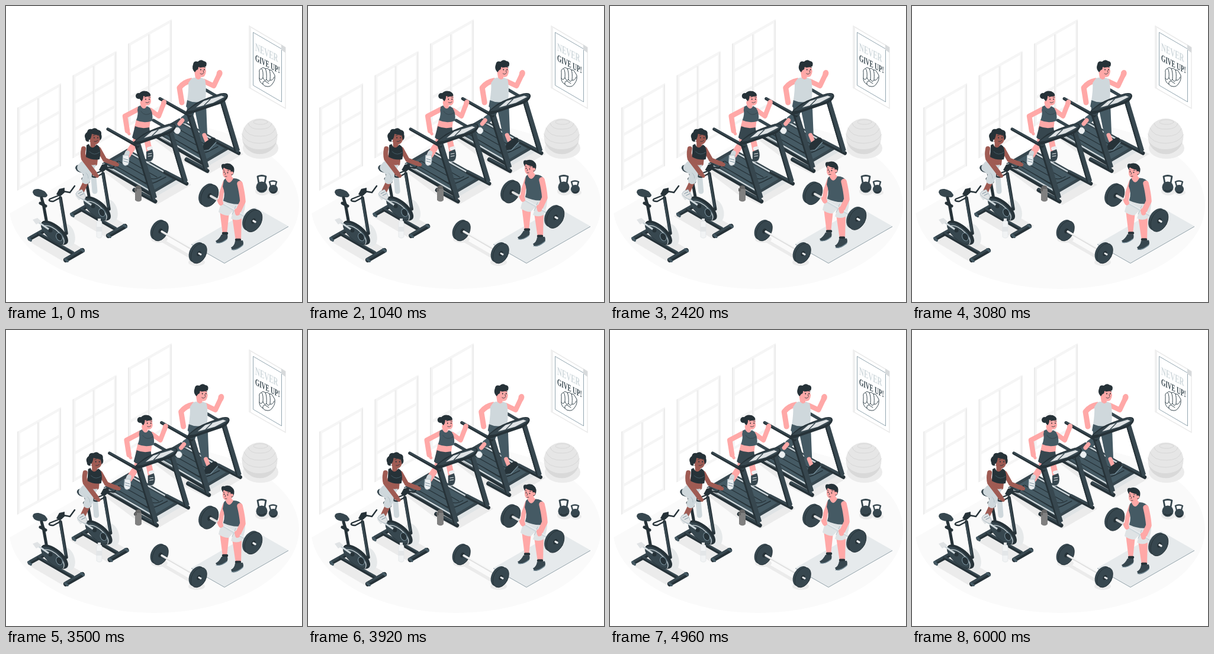
An HTML page for the animation above (6.04 s loop, 500 by 500 pixels).

```html
<!DOCTYPE html>
<html lang="en">
<head>
<meta charset="utf-8">
<title>Gym</title>
<style>
html, body { margin: 0; width: 100%; height: 100%; overflow: hidden; background: #fff }
svg { display: block; width: 100vw; height: 100vh }
.line { fill: none; stroke-linecap: round; stroke-linejoin: round }
.skin { stroke: #ffa8a7 }
.brown { stroke: #9f5b53 }
.dark { stroke: #37474f }
.deep { stroke: #263238 }
.cloth { stroke: #cfd8dc }
text { font: bold 19px "Liberation Serif", serif }
</style>
</head>
<body>
<svg viewBox="0 0 500 500">
<defs>
  <clipPath id="room"><path d="M0 354L285 190L500 190V500H0z"/></clipPath>

  <g id="window" transform="matrix(1 -.567 0 1 19 172)">
    <path d="M0 0H74V140H0z" fill="#f5f5f5"/>
    <path d="M0 0H2V140H0zM72 2h2V140h-2zM34 4h2V136h-2z" fill="#ebebeb"/>
    <path d="M5 5H34V45H5zM38 5H70V45H38zM5 50H34V90H5zM38 50H70V90H38zM5 95H34V135H5zM38 95H70V135H38z" fill="#fff"/>
  </g>

  <g id="plate">
    <ellipse rx="12" ry="18" transform="translate(-1.8 -1) rotate(28)" fill="#37474f"/>
    <ellipse rx="12" ry="18" transform="translate(1.8 1) rotate(28)" fill="#37474f" stroke="#263238" stroke-width=".8"/>
    <ellipse rx="3" ry="4.5" transform="translate(1.8 1) rotate(28)" fill="#263238"/>
  </g>

  <g id="deck" class="line">
    <path d="M249 193L280 211" class="dark" stroke-width="5"/>
    <path d="M162 266L205 241L293 291L246 321z" fill="#37474f"/>
    <path d="M162 268L246 317V322L162 273z" fill="#263238"/>
    <path d="M172 266L203 248L281 292L246 313z" fill="#455a64"/>
    <path d="M180 267L234 298Q244 302 254 297L270 289M190 262L240 290Q250 295 262 288M201 258L255 289M174 263L244 305" class="deep" stroke-width="1.4"/>
    <path d="M165 267L243 312M206 246L288 292" stroke="#cfd8dc" stroke-width="2.4"/>
    <path d="M248 317L291 292L298 296L255 321z" fill="#dfe3e5"/>
    <path d="M269 281L305 300" class="deep" stroke-width="6.5"/>
    <path d="M269 279L304 297" class="dark" stroke-width="4"/>
    <path d="M274 215L282 212L307 295L299 300z" fill="#37474f"/>
    <path d="M274 215L276 214L301 299L299 300z" fill="#263238"/>
  </g>

  <g id="console" class="line">
    <path d="M217 311L252 330" class="deep" stroke-width="7"/>
    <path d="M217 309L251 327" class="dark" stroke-width="4"/>
    <path d="M216 231L226 228L255 323L246 328z" fill="#37474f"/>
    <path d="M216 231L219 230L248 327L246 328z" fill="#263238"/>
    <path d="M172 208L223 237" class="deep" stroke-width="5"/>
    <path d="M172 207L223 235" class="dark" stroke-width="3"/>
    <path d="M215 231Q217 227 232 216Q250 206 275 199Q287 197 287 204Q286 210 276 216L229 232Q216 237 215 231z" fill="#263238"/>
    <path d="M218 229Q238 211 276 200Q285 199 285 203Q283 208 274 212L228 228z" fill="#37474f"/>
    <path d="M233 223L246 212L276 203L281 205L262 215z" fill="#dfe3e5"/>
    <path d="M247 219L257 209" stroke="#37474f" stroke-width="1.4"/>
  </g>

  <g id="bike" class="line">
    <ellipse cx="104" cy="387" rx="12" ry="20" transform="rotate(-16 104 387)" fill="#e6e9ea"/>
    <path d="M40 393L71 376" class="deep" stroke-width="7"/>
    <path d="M40 391L70 374" class="dark" stroke-width="4"/>
    <path d="M55 385L114 419" class="deep" stroke-width="5"/>
    <path d="M55 383L114 416" class="dark" stroke-width="3"/>
    <path d="M101 429L129 413" class="deep" stroke-width="8"/>
    <path d="M101 427L128 411" class="dark" stroke-width="4"/>
    <path d="M38 392l4 4M100 428l4 3M127 411l4 3" stroke="#455a64" stroke-width="4"/>
    <path d="M102 384L92 324" class="deep" stroke-width="5.5"/>
    <path d="M101 380L91 324" class="dark" stroke-width="3.5"/>
    <path d="M69 367L63 334" class="deep" stroke-width="5"/>
    <path d="M58 333L67 338" class="deep" stroke-width="5"/>
    <ellipse cx="82" cy="383" rx="28" ry="13" transform="rotate(40 82 383)" fill="#263238"/>
    <ellipse cx="80" cy="384" rx="25" ry="10.5" transform="rotate(40 80 384)" fill="#37474f"/>
    <path d="M66 371Q77 370 90 383Q101 395 97 402" stroke="#cfd8dc" stroke-width="1.2"/>
    <ellipse cx="90" cy="390" rx="5" ry="7" transform="rotate(-25 90 390)" fill="#263238" stroke="#78909c"/>
    <path d="M56 366L75 379" class="cloth" stroke-width="3"/>
    <circle cx="75" cy="379" r="3.5" fill="#263238"/>
    <path d="M45 361L53 358L60 364L51 369z" fill="#e0e3e5"/>
    <path d="M45 315Q45 308 55 309Q66 311 70 319Q70 324 63 323Q48 324 45 315z" fill="#37474f"/>
    <path d="M60 324L63 335" class="deep" stroke-width="5"/>
    <path d="M94 318L74 326Q70 330 80 330L91 324M97 313L108 315L116 304" class="deep" stroke-width="2.4"/>
    <path d="M85 318L90 309L99 307L99 315L91 322z" fill="#263238"/>
  </g>
</defs>

<!-- room -->
<ellipse cx="250" cy="337" rx="245" ry="141" fill="#fafafa" clip-path="url(#room)"/>
<use href="#window"/>
<use href="#window" x="93.5" y="-54.5"/>
<use href="#window" x="187" y="-108"/>

<g fill="#ebebeb">
  <path d="M160 276L205 252L313 302L254 336L216 318z"/>
  <path d="M248 224L293 200L401 250L342 284L304 266z"/>
  <path d="M36 396L70 376L134 412L101 434z"/>
  <path d="M108 355L142 335L206 371L173 393z"/>
  <ellipse cx="430" cy="240" rx="30" ry="18"/>
  <ellipse cx="433" cy="313" rx="12" ry="7"/>
  <ellipse cx="453" cy="315" rx="9" ry="5"/>
  <ellipse cx="259" cy="394" rx="14" ry="6"/>
  <ellipse cx="322" cy="433" rx="14" ry="6"/>
  <path d="M262 392L312 421L308 425L258 396z"/>
</g>

<!-- poster -->
<path d="M411 34L472 70V173L411 138z" fill="#fff" stroke="#ebebeb" stroke-width="1.5"/>
<path d="M411 34L414 36V139L411 138z" fill="#f0f0f0"/>
<path d="M417.5 44.5L465.500 72.500V162L417.500 134z" fill="none" stroke="#78909c" stroke-width=".8"/>
<path d="M465 65L472 70V79L465 74z" fill="#d7dadc"/>
<g transform="matrix(.58 .3 0 1 421 75)">
  <text fill="#cfd8dc">NEVER</text>
  <text y="17.500" fill="#37474f" style="font-size:16px">GIVE UP!</text>
</g>
<g class="line dark" stroke-width="1">
  <path d="M428 112Q427 107 431 106Q434 102 438 106Q442 104 445 108Q449 107 451 112L454 117Q455 125 451 130Q447 137 441 136Q436 136 434 132Q429 130 428 124z" fill="#fff"/>
  <path d="M432 106Q435 110 434 121M438 106Q441 111 440 124M445 108Q447 113 446 125M428 122Q431 127 434 121Q437 128 440 124Q443 130 446 125Q450 127 453 120M434 132Q433 126 438 127L444 131"/>
</g>

<!-- ball and kettlebells -->
<circle cx="428.500" cy="220" r="30" fill="#e6e6e6"/>
<path d="M399.500 228Q410 243 430 242Q450 241 457.500 228A30 30 0 0 1 399.500 228z" fill="#d9d9d9"/>
<g class="line" stroke="#d4d4d4" stroke-width=".8">
  <ellipse cx="430" cy="196" rx="12" ry="4"/>
  <path d="M409 198Q412 209 430 208Q447 208 449 198M402 206Q408 221 430 220Q450 220 455 207M398.500 216Q405 232 429 232Q452 231 458.500 217"/>
</g>
<g class="line dark">
  <path d="M427 299L425 288Q432 285 439 288L437 299" stroke-width="2.800"/>
  <circle cx="432" cy="306" r="9.600" fill="#37474f" stroke="none"/>
  <path d="M447 304L445 297Q451 294 457 297L455 304" stroke-width="2.400"/>
  <circle cx="451.500" cy="309.500" r="7.600" fill="#37474f" stroke="none"/>
  <path d="M427 311Q432 315 438 310M448 314Q452 317 456 313" class="deep" stroke-width="2"/>
</g>

<path d="M313 402L421 340L477 372L369 434z" fill="#e6eaec"/>
<path d="M313 402.500L369 434.500L477 372.500" fill="none" stroke="#90a0a8"/>
<use href="#bike"/>

<!-- machines and runners -->
<g id="shaker">
  <use href="#deck" x="88" y="-51.500"/>
  <g class="line">
    <path d="M312 168Q314 182 304 190L301 192" stroke="#455a64" stroke-width="13"/>
    <path d="M298 193L293 199" class="skin" stroke-width="7"/>
    <path d="M285 207Q290 203 293 207Q297 211 291 216Q285 216 284 211z" fill="#eceff1" stroke="#cfd8dc"/>
    <path d="M318 166H337L339 216L329 219z" fill="#455a64" stroke="#455a64" stroke-width="2"/>
    <path d="M335 218L339 228" class="skin" stroke-width="7"/>
    <path d="M330 243L335 231L348 222Q356 221 354 230L344 241Q335 249 330 243z" fill="#263238"/>
    <path d="M331 245L343 243L355 230" stroke="#78909c" stroke-width="1.200"/>
    <path d="M313 126Q301 128 293 138L297 163" class="skin" stroke-width="9"/>
    <path d="M334 127L351 135L360 116" class="skin" stroke-width="8.500"/>
    <path d="M356 112Q359 106 364 109Q368 114 362 121L355 120z" fill="#ffa8a7"/>
    <path d="M323 112L325 125" class="skin" stroke-width="9"/>
    <path d="M313 123Q319 119 322 123Q326 126 330 121L336 124Q339 136 337 160Q321 167 306 160Q309 140 308 130z" fill="#cfd8dc"/>
    <path d="M306 159Q321 166 337 159L338 172Q320 181 304 170z" fill="#455a64"/>
    <path d="M319 101Q324 95 335 98L338 110Q337 120 331 120Q321 120 319 108z" fill="#ffa8a7"/>
    <path d="M319 112Q313 106 316 99Q317 92 324 94Q329 89 334 93Q341 94 338 102Q331 105 325 103Q325 108 322 108z" fill="#263238"/>
    <path d="M329 107v1M335 107v1" class="deep" stroke-width="1.600"/>
    <path d="M327 104l3-1M334 103l3 1M333 109l1 3M328 114Q331 117 334 113" class="deep" stroke-width=".8"/>
  </g>
  <use href="#console" x="88" y="-51.500"/>

  <use href="#deck"/>
  <g class="line">
    <path d="M222 217Q220 231 214 238L205 252" class="skin" stroke-width="11"/>
    <path d="M205 248L203 254" class="cloth" stroke-width="8"/>
    <path d="M198 252L207 252Q209 262 206 268Q199 272 197 265z" fill="#eceff1" stroke="#b0bec5"/>
    <path d="M199 258l7 2M199 262l7 2" stroke="#78909c"/>
    <path d="M234 216L239 230L242 244" class="skin" stroke-width="10"/>
    <path d="M241 241L245 240" stroke="#eceff1" stroke-width="6"/>
    <path d="M237 246L247 242Q251 252 247 261Q241 267 237 261z" fill="#37474f"/>
    <path d="M238 263Q244 265 247 260M240 250l6-1M240 254l6-1" stroke="#eceff1"/>
    <path d="M224 174L201 186L205 211" class="skin" stroke-width="8.500"/>
    <path d="M203 207L208 216" class="skin" stroke-width="5"/>
    <path d="M244 176L258 186L265 168" class="skin" stroke-width="8"/>
    <path d="M263 170Q260 161 266 158Q272 158 271 164L268 171z" fill="#ffa8a7"/>
    <path d="M220 192H244L242 208H216z" fill="#ffa8a7"/>
    <path d="M218 203Q229 208 242 205L244 219Q238 223 230 219L225 226Q217 227 213 222z" fill="#37474f"/>
    <path d="M231 163L233 174" class="skin" stroke-width="9"/>
    <path d="M223 170L227 168Q233 178 238 169L243 172Q249 181 247 194Q233 199 220 193Q224 182 222 176z" fill="#455a64"/>
    <path d="M228 178Q235 188 246 180" class="dark"/>
    <path d="M228 151Q235 147 244 151L245 161Q244 168 238 168Q229 166 228 158z" fill="#ffa8a7"/>
    <circle cx="224" cy="152" r="5" fill="#263238"/>
    <path d="M229 161Q223 156 225 148Q229 142 238 144Q245 147 244 152Q237 154 232 152Q232 158 229 161z" fill="#263238"/>
    <path d="M236 157v1M242 157v1" class="deep" stroke-width="1.500"/>
    <path d="M234 154l3-1M241 154h3M236 163Q239 165 242 162" class="deep" stroke-width=".8"/>
  </g>
  <use href="#console"/>

  <g class="line">
    <path d="M134 276Q147 279 148 290L150 313" class="cloth" stroke-width="9"/>
    <use href="#bike" x="72" y="-41"/>
    <path d="M157 242L167 260L185 267" class="brown" stroke-width="7.500"/>
    <path d="M183 265L188 268" class="brown" stroke-width="6"/>
    <path d="M135 297L127 314" class="brown" stroke-width="9"/>
    <path d="M127 273Q138 279 138 286L135 294" class="cloth" stroke-width="14"/>
    <path d="M128 277Q140 283 139 291" stroke="#b0bec5" stroke-width="1"/>
    <path d="M121 313L128 310L132 316Q137 325 131 327Q122 324 118 318z" fill="#e0e3e5" stroke="#b0bec5"/>
    <path d="M122 317l6-3M125 320l6-3" stroke="#78909c"/>
    <path d="M136 246L156 250L154 268Q146 276 129 267L133 256z" fill="#9f5b53"/>
    <path d="M128 262Q140 271 152 268L148 278Q132 286 121 277Q121 267 128 262z" fill="#cfd8dc"/>
    <path d="M147 226L147 242" class="brown" stroke-width="9"/>
    <path d="M136 235L140 233Q145 245 153 234L157 237Q161 246 158 259Q146 261 135 255z" fill="#263238"/>
    <path d="M141 246Q149 254 158 247" stroke="#455a64"/>
    <path d="M131 241Q129 251 131 258L150 283" class="brown" stroke-width="8"/>
    <path d="M148 283L154 287" class="brown" stroke-width="6"/>
    <path d="M139 216Q149 209 159 216L159 226Q156 234 150 234Q140 231 139 223z" fill="#9f5b53"/>
    <path d="M140 229Q134 230 134 224Q131 217 137 213Q138 207 145 208Q151 204 155 209Q162 210 161 217Q163 223 159 227L157 218Q150 218 145 216Q144 223 142 225z" fill="#263238"/>
    <path d="M149 222v1M155 222v1" class="deep" stroke-width="1.600"/>
    <path d="M147 219l3-1M154 218l3 1M149 229Q152 230 155 227" class="deep" stroke-width=".8"/>
    <circle cx="141" cy="227" r="1.200" fill="#eceff1"/>
  </g>
</g>

<!-- bottles -->
<path d="M153 367Q153 363 155 363H160Q162 363 162 367V390Q158 394 153 390z" fill="#f1f3f4" stroke="#dfe3e5" stroke-width=".7"/>
<path d="M155 359h5v5h-5z" fill="#e3e6e8"/>
<path d="M153 373h9v8h-9z" fill="#e3e6e8"/>
<path d="M218 311Q218 307 221 307H226Q229 307 229 311V328Q224 333 218 328z" fill="#808080"/>
<path d="M219 305Q223 301 228 305V309H219zM217 308h4v5h-4z" fill="#666"/>

<!-- barbell on the floor -->
<g class="line">
  <use href="#plate" x="259" y="379"/>
  <path d="M263 381L318 413" stroke="#e0e0e0" stroke-width="3.400"/>
  <path d="M263 380L317 411" stroke="#f8f9f9" stroke-width="1.500"/>
  <use href="#plate" x="324" y="417"/>
  <path d="M326 418l3 1.600" stroke="#eceff1" stroke-width="3"/>
</g>

<g id="lifter" class="line">
  <use href="#plate" transform="translate(342 319.500) scale(1.1)"/>
  <path d="M346 321L364 331" stroke="#e0e0e0" stroke-width="4"/>
  <path d="M370 298L364 316L362 331" class="skin" stroke-width="7.500"/>
  <path d="M361 345L377 348L373 386H366z" fill="#ffa8a7"/>
  <path d="M382 356L398 354L397 397H388z" fill="#ffa8a7"/>
  <path d="M367 384h6M389 395h6" class="deep" stroke-width="4.500"/>
  <path d="M354 397Q360 394 364 386L374 386Q376 393 371 396Q362 402 356 400z" fill="#37474f"/>
  <path d="M380 408Q386 405 387 397L400 396Q403 404 397 407Q388 414 382 412z" fill="#37474f"/>
  <path d="M355 400Q363 402 373 394M381 411.500Q390 413 400 404" stroke="#78909c" stroke-width="1.100"/>
  <path d="M368 325L404 329Q405 344 398 359Q389 364 380 359L384 346L376 354Q367 354 359 348Q361 337 368 325z" fill="#dfe3e5"/>
  <path d="M388 338L382 352" stroke="#b0bec5"/>
  <path d="M375 285L379 298" class="skin" stroke-width="10"/>
  <path d="M368 294L371 291Q376 303 384 291Q395 291 399 299L404 333Q386 338 367 329Q371 316 366 305z" fill="#455a64"/>
  <path d="M371 292Q377 305 384 291L380 287H373z" fill="#ffa8a7"/>
  <path d="M362 331L410 359" stroke="#cfd8dc" stroke-width="4"/>
  <path d="M362 330L410 357.500" stroke="#eceff1" stroke-width="1.600"/>
  <path d="M395 300Q399 316 400 330L393 345" class="skin" stroke-width="9.500"/>
  <path d="M390 346L391 350M361 329L363 333" class="skin" stroke-width="8"/>
  <use href="#plate" transform="translate(416 362) scale(1.1)"/>
  <path d="M418 363l3 1.700" stroke="#eceff1" stroke-width="3.400"/>
  <path d="M366 273Q374 267 384 273L384 282Q380 292 373 291Q366 290 366 282z" fill="#ffa8a7"/>
  <path d="M366 277L364 272Q363 266 369 267Q377 264 382 269Q388 274 384 284L381 286L379 277Q372 276 368 273z" fill="#263238"/>
  <circle cx="381.500" cy="282" r="2.500" fill="#ffa8a7"/>
  <path d="M368.500 280v1M374.500 281v1" class="deep" stroke-width="1.500"/>
  <path d="M367 277l2 .5M374 278l3 0M371 282l-1 3M370 288h3" class="deep" stroke-width=".8"/>
</g>
</svg>
<script>
const LOOP = 6040, SPAN = 6000;
const shake = [0, -1, 2, -4, 4, -4, 4, -4, 2, -1, 0];
const shaker = document.getElementById('shaker');
const lifter = document.getElementById('lifter');

function draw(now) {
  const t = Math.min(now % LOOP, SPAN);
  const k = t / 600, i = Math.min(Math.floor(k), 9);
  const x = shake[i] + (shake[i + 1] - shake[i]) * (k - i);
  const y = 9 * (Math.abs(t % 3000 / 1500 - 1) - 1);
  shaker.setAttribute('transform', `translate(${x} 0)`);
  lifter.setAttribute('transform', `translate(0 ${y})`);
  requestAnimationFrame(draw);
}
draw(performance.now());
</script>
</body>
</html>
```
